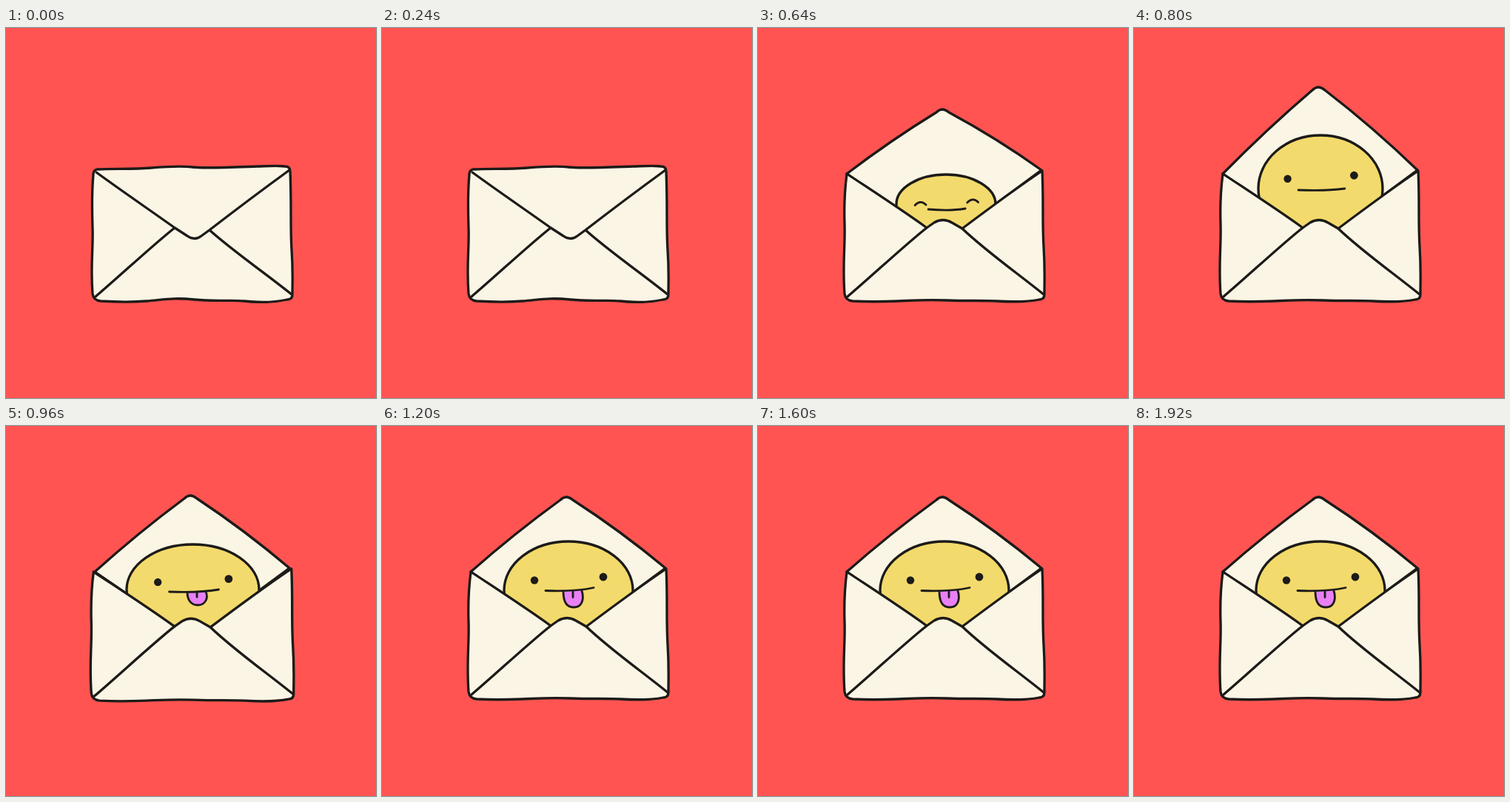
Animation, 500 px wide and 500 px high, one loop 2 s. Source, as an HTML page:

```html
<!DOCTYPE html>
<html lang="en">
<head>
<meta charset="utf-8">
<title>Cheeky letter</title>
<style>
  html, body { margin: 0; width: 100%; height: 100%; overflow: hidden; background: #ff5452; }
  svg { display: block; width: 100vw; height: 100vh; }
  .ink { fill: none; stroke: #1c1b19; stroke-width: 3.3; stroke-linecap: round; stroke-linejoin: round; }
  .thin { stroke-width: 2.8; }
  .paper { fill: #faf5e4; }
  .skin { fill: #f3da6c; }
  .tongue { fill: #e980f5; }
  .dot { fill: #1c1b19; }
</style>
</head>
<body>
<svg viewBox="0 0 500 500">
  <defs>
    <filter id="soft" x="0" y="0" width="500" height="500" filterUnits="userSpaceOnUse" color-interpolation-filters="sRGB">
      <feTurbulence id="grain" type="fractalNoise" baseFrequency="0.2" numOctaves="1" seed="1" result="n"/>
      <feDisplacementMap in="SourceGraphic" in2="n" scale="1.2" xChannelSelector="R" yChannelSelector="G"/>
      <feGaussianBlur stdDeviation="0.75"/>
    </filter>
  </defs>
  <g filter="url(#soft)">
    <g id="closed">
      <path class="ink paper" d="M123 191 C150 190 172 191 196 189 S236 186 252 188 S310 188 340 187 S366 186 377 187
        Q384 187 384 194 C386 240 384 270 386 300 S387 340 387 360 Q387 367 380 367
        C362 371 340 371 322 369 S284 370 255 367 S214 367 190 369 S145 370 128 369
        Q118 368 117 359 C114 320 118 300 117 270 S116 220 118 198 Q118 192 123 191Z"/>
      <path class="ink" d="M122 195 C152 217 190 243 228 270 L245 281 Q255 288 264 281 L275 273 C310 246 350 216 383 192
        M228 270 C200 292 155 334 121 363 M275 273 C306 301 350 331 386 360"/>
    </g>
    <g id="open">
      <path id="flap" class="ink paper"/>
      <g id="face">
        <ellipse id="head" class="ink skin"/>
        <g id="awake"><circle id="eyeL" class="dot" r="5.2"/><circle id="eyeR" class="dot" r="5.4"/></g>
        <path id="asleep" class="ink thin"/>
        <path id="tongue" class="ink thin tongue"/>
        <path id="mouth" class="ink thin"/>
      </g>
      <g id="pocket">
        <path class="ink paper" d="M120 197 C150 217 192 244 228 270 L238 263 Q250 256 262 263 L276 271 C312 244 350 216 384 193
          C386 230 384 262 386 295 S387 340 387 360 Q387 367 380 367
          C360 371 340 370 322 369 S284 369 255 368 S214 368 190 369 S145 370 128 369
          Q118 368 117 359 C114 320 118 295 117 265 S117 220 120 197Z"/>
        <path class="ink" d="M228 270 C200 292 155 334 121 363 M276 271 C306 300 350 331 386 360"/>
      </g>
    </g>
  </g>
</svg>
<script>
const STEP = 80, STEPS = 25, OPEN_AT = 8;

// flap tip y, head cx, rx, ry, cy, mouth y, mouth tilt, tongue length, eyes open
const poses = [
  [109, 254, 67, 40, 238, 245, 1, 0, 0],
  [86, 253, 80, 64, 221, 228, 1, 0, 0],
  [79, 252, 84, 72, 217, 219, 2, 0, 1],
  [87, 252, 87, 66, 220, 221, 2, 10, 1],
  [93, 252.5, 89.5, 61, 221, 224, 3, 18, 1],
  [96, 252, 88, 64, 222, 223, 4, 22, 1],
  [95, 252, 87, 66, 222, 222.5, 4, 22.5, 1]
];

const el = id => document.getElementById(id);
const set = (id, attrs) => {
  for (const k in attrs) el(id).setAttribute(k, attrs[k]);
};
const show = (id, on) => { el(id).style.display = on ? "" : "none"; };
const lid = (x, y) => `M${x - 7.5} ${y + 3} Q${x} ${y - 5} ${x + 7.5} ${y + 2.5}`;

function drawPose([tip, cx, rx, ry, cy, my, tilt, lick, awake]) {
  const side = tip + 5, mid = (side + 192) / 2;
  set("flap", { d: `M120 197 Q179 ${mid - 1} 241 ${side} Q249 ${tip - 3} 258 ${side}
    Q323 ${mid - 4} 383 192 L276 271 H228Z` });
  set("head", { cx, cy, rx, ry });

  // the pocket bulges a little when the head is squashed wide
  const bulge = 1 + Math.max(0, rx - 87) / 200;
  set("pocket", { transform: `translate(252 197) scale(${bulge}) translate(-252 -197)` });

  const k = rx / 87;
  const leftX = cx - 46 * k, rightX = cx + 47 * k;
  const leftY = my - 14 * ry / 66, rightY = leftY - 4.5;
  set("eyeL", { cx: leftX, cy: leftY });
  set("eyeR", { cx: rightX, cy: rightY });
  set("asleep", { d: lid(leftX + 1, leftY) + lid(rightX, rightY + 1) });
  show("awake", awake);
  show("asleep", !awake);

  const sag = awake ? 1.5 : 2.5;
  set("mouth", { d: `M${cx - 31 * k} ${my} Q${cx + 8 * k} ${my + sag} ${cx + 34 * k} ${my - tilt}` });

  const b = my + lick;
  set("tongue", { d: `M245 ${my + 1} C245 ${b - 7} 250 ${b} 259 ${b} C269 ${b} 274 ${b - 9} 270 ${my}
    M258 ${my + 1} V${my + lick * 0.4}` });
  show("tongue", lick);
}

let last = -1;
function draw(now) {
  const step = Math.floor(now / STEP) % STEPS;
  if (step !== last) {
    last = step;
    const isOpen = step >= OPEN_AT;
    show("closed", !isOpen);
    show("open", isOpen);
    if (isOpen) drawPose(poses[Math.min(step - OPEN_AT, poses.length - 1)]);
    set("grain", { seed: 1 + step % 3 });
  }
}

const start = performance.now();
function tick() {
  draw(performance.now() - start);
  requestAnimationFrame(tick);
}
tick();
</script>
</body>
</html>
```
